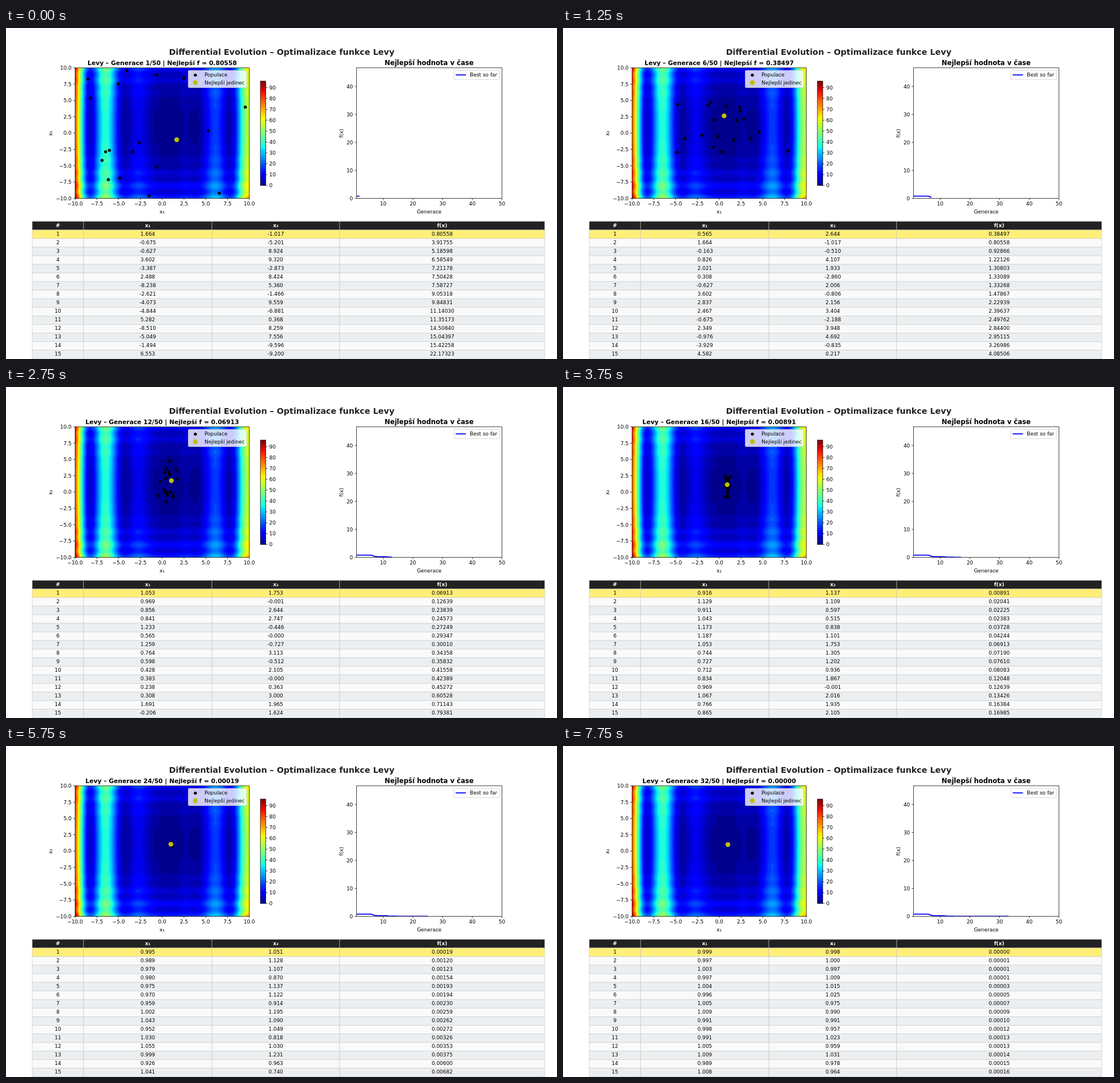
These frames come from a looping animation (966 by 580 pixels, 8000 ms). An HTML page with a canvas:

```html
<!DOCTYPE html>
<html lang="cs">
<head>
<meta charset="utf-8">
<title>Differential Evolution</title>
<style>
html, body { margin: 0; width: 966px; height: 580px; overflow: hidden; background: #fff; }
canvas, svg { position: absolute; left: 0; top: 0; display: block; }
text { font-family: "DejaVu Sans", sans-serif; font-size: 8.944px; white-space: pre; }
</style>
</head>
<body>
<canvas id="map" width="966" height="580"></canvas>
<svg id="fig" width="966" height="580" viewBox="0 0 966 580"></svg>
<script>
const LOOP = 8000, STEP = 250, ROWS = 15, SIZE = 20, PT = 0.8944;
const L = { x0: 121.1, x1: 426.6, y0: 69.8, y1: 298.5 };
const R = { x0: 614.5, x1: 869.5, y0: 69.8, y1: 298.5 };

// Key points of the search: generation, x1, x2 and f of each new best.
const BEST = [
  [1, 1.664, -1.017, .80558], [6, .565, 2.644, .38497], [7, .856, 2.644, .23839],
  [11, .969, -.001, .12639], [12, 1.053, 1.753, .06913], [14, 1.129, 1.109, .02041],
  [16, .916, 1.137, .00891], [18, .975, 1.137, .00193], [20, .989, 1.128, .0012],
  [24, .995, 1.051, .00019], [28, .997, 1, .00001], [32, .999, .998, 0]
];

const sq = v => v * v;
const sx = v => L.x0 + (v + 10) / 20 * (L.x1 - L.x0);
const sy = v => L.y1 - (v + 10) / 20 * (L.y1 - L.y0);
const gx = v => R.x0 + (v - 1) / 49 * (R.x1 - R.x0);
const gy = v => R.y1 - v * 4.905;

function levy(x, y) {
  const a = 1 + (x - 1) / 4, b = 1 + (y - 1) / 4;
  return sq(Math.sin(Math.PI * a))
    + sq(a - 1) * (1 + 10 * sq(Math.sin(Math.PI * a + 1)))
    + sq(b - 1) * (1 + sq(Math.sin(2 * Math.PI * b)));
}

function seeded(s) {
  return () => {
    s = s + 0x6D2B79F5 | 0;
    let t = Math.imul(s ^ s >>> 15, 1 | s);
    t = t + Math.imul(t ^ t >>> 7, 61 | t) ^ t;
    return ((t ^ t >>> 14) >>> 0) / 4294967296;
  };
}

// Differential evolution (rand/1/bin); no trial may beat the key points.
function evolve(count) {
  const rnd = seeded(7), F = .5, CR = .7;
  const pick = n => Math.floor(rnd() * n);
  const member = (x, y) => ({ x, y, f: levy(x, y) });
  const byF = (p, q) => p.f - q.f;
  const gens = [];
  let pop = [], floor = 0;
  while (pop.length < SIZE) {
    const m = member(rnd() * 20 - 10, rnd() * 20 - 10);
    if (m.f > 3) pop.push(m);
  }
  for (let g = 1; g <= count; g++) {
    if (g > 1) pop = pop.map((old, i) => {
      const others = pop.filter((_, j) => j !== i);
      const [a, b, c] = [0, 0, 0].map(() => others.splice(pick(others.length), 1)[0]);
      const forced = pick(2);
      const [x, y] = ["x", "y"].map((k, n) => {
        const v = a[k] + F * (b[k] - c[k]);
        return n === forced || rnd() < CR ? Math.max(-10, Math.min(10, v)) : old[k];
      });
      const trial = member(x, y);
      return trial.f < old.f && trial.f > floor ? trial : old;
    });
    pop.sort(byF);
    const key = BEST.find(k => k[0] === g);
    if (key) {
      const [, x, y, f] = key;
      pop[SIZE - 1] = { x, y, f };
      floor = f;
      pop.sort(byF);
    }
    gens[g] = pop.slice();
  }
  return gens;
}
const gens = evolve(LOOP / STEP);

function ramp(t, pts) {
  for (let i = 1; i < pts.length; i++) {
    const [p, u] = pts[i - 1], [q, v] = pts[i];
    if (t <= q) return 255 * (u + (v - u) * (t - p) / (q - p));
  }
  return 255 * pts[pts.length - 1][1];
}
const jet = t => [
  ramp(t, [[0, 0], [.35, 0], [.66, 1], [.89, 1], [1, .5]]),
  ramp(t, [[0, 0], [.125, 0], [.375, 1], [.64, 1], [.91, 0], [1, 0]]),
  ramp(t, [[0, .5], [.11, 1], [.34, 1], [.65, 0], [1, 0]])
];
const bands = Array.from({ length: 48 }, (_, i) => jet((2 * i + 1) / 96));

function paintMap() {
  const ctx = document.getElementById("map").getContext("2d");
  const w = 306, h = 229, ox = 121, oy = 70, n = 3;
  const img = ctx.createImageData(w, h);
  for (let j = 0; j < h; j++) for (let i = 0; i < w; i++) {
    const sum = [0, 0, 0];
    for (let k = 0; k < n * n; k++) {
      const px = ox + i + (k % n + .5) / n, py = oy + j + (Math.floor(k / n) + .5) / n;
      const x = (px - L.x0) / (L.x1 - L.x0) * 20 - 10, y = (L.y1 - py) / (L.y1 - L.y0) * 20 - 10;
      const c = bands[Math.min(47, Math.floor(levy(x, y) / 2))];
      for (let m = 0; m < 3; m++) sum[m] += c[m];
    }
    const o = (j * w + i) * 4;
    for (let m = 0; m < 3; m++) img.data[o + m] = sum[m] / (n * n);
    img.data[o + 3] = 255;
  }
  ctx.putImageData(img, ox, oy);
}

const fig = document.getElementById("fig");
function add(tag, attrs, label) {
  const el = document.createElementNS("http://www.w3.org/2000/svg", tag);
  for (const k in attrs) el.setAttribute(k, attrs[k]);
  if (label !== undefined) el.textContent = label;
  return fig.appendChild(el);
}
const put = (x, y, label, anchor = "middle", style = "") =>
  add("text", { x, y, "text-anchor": anchor, style }, label);
const bold = pt => `font-weight:bold;font-size:${pt * PT}px`;
const line = (x1, y1, x2, y2, stroke = "#000", width = .75) =>
  add("line", { x1, y1, x2, y2, stroke, "stroke-width": width });
const rect = (x, y, width, height, more) => add("rect", { x, y, width, height, ...more });
const turned = (x, y, label) =>
  add("text", { transform: `translate(${x} ${y}) rotate(-90)`, "text-anchor": "middle" }, label);
const edge = { fill: "none", stroke: "#000", "stroke-width": .75 };
const frame = a => rect(a.x0, a.y0, a.x1 - a.x0, a.y1 - a.y0, edge);
const legend = (x, y, w, h) => rect(x, y, w, h,
  { rx: 1.8, fill: "#fff", "fill-opacity": .8, stroke: "#ccc", "stroke-opacity": .8, "stroke-width": .9 });
const dot = (cx, cy, r, fill) => add("circle", { cx, cy, r, fill });
const signed = v => v.toFixed(1).replace("-", "\u2212");

function xTick(x, y, label) { line(x, y, x, y + 3.1); put(x, y + 12.8, label); }
function yTick(x, y, label) { line(x - 3.1, y, x, y); put(x - 6.2, y + 3.3, label, "end"); }

paintMap();
put(483.3, 46.6, "Differential Evolution – Optimalizace funkce Levy", "middle", bold(16) + ";fill:#222");

// left plot
const title = put(273.9, 64.7, "", "middle", bold(12));
for (let v = -10; v <= 10; v += 2.5) {
  xTick(sx(v), L.y1, signed(v));
  yTick(L.x0, sy(v), signed(v));
}
put(273.6, 324.8, "x₁");
turned(81, 184.5, "x₂");
const dots = Array.from({ length: SIZE }, () => dot(0, 0, 2.7, "#000"));
const star = dot(0, 0, 4.2, "#bfbf00");
frame(L);
legend(319.5, 74.3, 102.4, 30.2);
dot(332, 82.6, 2.7, "#000");
dot(332, 95.8, 4.2, "#bfbf00");
put(348, 85.2, "Populace", "start");
put(348, 98.5, "Nejlepší jedinec", "start");

// colour bar
const unit = 183 / 96;
bands.forEach((c, i) => rect(446, 276 - (2 * i + 2) * unit, 9.3, 2 * unit + (i ? .4 : 0),
  { fill: `rgb(${c.map(Math.round)})` }));
rect(446, 93, 9.3, 183, edge);
for (let v = 0; v <= 90; v += 10) {
  const y = 276 - v * unit;
  line(455.3, y, 458.4, y);
  put(461.6, y + 3.3, v, "start");
}

// right plot
put(741.8, 64.7, "Nejlepší hodnota v čase", "middle", bold(13));
for (let v = 10; v <= 50; v += 10) xTick(gx(v), R.y1, v);
for (let v = 0; v <= 40; v += 10) yTick(R.x0, gy(v), v);
put(742, 324.8, "Generace");
turned(591, 184.5, "f(x)");
const clip = add("clipPath", { id: "box" });
clip.appendChild(rect(R.x0, R.y0, R.x1 - R.x0, R.y1 - R.y0, {}));
const curve = add("polyline", { fill: "none", stroke: "#00f", "stroke-width": 1.79,
  "stroke-linejoin": "round", "clip-path": "url(#box)" });
frame(R);
legend(785, 74.3, 80, 16.2);
line(788.4, 82.2, 806.4, 82.2, "#00f", 1.79);
put(813.3, 85.2, "Best so far", "start");

// table
const cols = [46, 136, 361, 585, 944.3], top0 = 338.9, rowH = 15.04;
const cells = [];
for (let r = 0; r <= ROWS; r++) {
  const fill = r === 0 ? "#222" : r === 1 ? "#ffef78" : r % 2 ? "#eceff1" : "#fafafa";
  const y = top0 + r * rowH;
  cells.push(["#", "x₁", "x₂", "f(x)"].map((head, c) => {
    rect(cols[c], y, cols[c + 1] - cols[c], rowH, { fill, stroke: "#c4c4c4", "stroke-width": .6 });
    return put((cols[c] + cols[c + 1]) / 2, y + rowH / 2 + 2.2, r ? (c ? "" : r) : head, "middle",
      r ? "" : bold(10) + ";fill:#fff");
  }));
}

let shown = 0;
function draw(t) {
  const g = 1 + Math.floor((t % LOOP) / STEP);
  if (g === shown) return;
  shown = g;
  const pop = gens[g], best = pop[0];
  title.textContent = `Levy – Generace ${g}/50 | Nejlepší f = ${best.f.toFixed(5)}`;
  const move = (el, m) => {
    el.setAttribute("cx", sx(m.x));
    el.setAttribute("cy", sy(m.y));
  };
  dots.forEach((d, i) => move(d, pop[i]));
  move(star, best);
  const pts = [[gx(1), gy(gens[1][0].f)]];
  for (let k = 1; k <= g; k++) pts.push([gx(k + 1), gy(gens[k][0].f)]);
  curve.setAttribute("points", pts.join(" "));
  for (let r = 1; r <= ROWS; r++) {
    const { x, y, f } = pop[r - 1];
    [x.toFixed(3), y.toFixed(3), f.toFixed(5)].forEach((v, c) => cells[r][c + 1].textContent = v);
  }
}
function tick() {
  draw(performance.now());
  requestAnimationFrame(tick);
}
draw(0);
requestAnimationFrame(tick);
</script>
</body>
</html>
```
